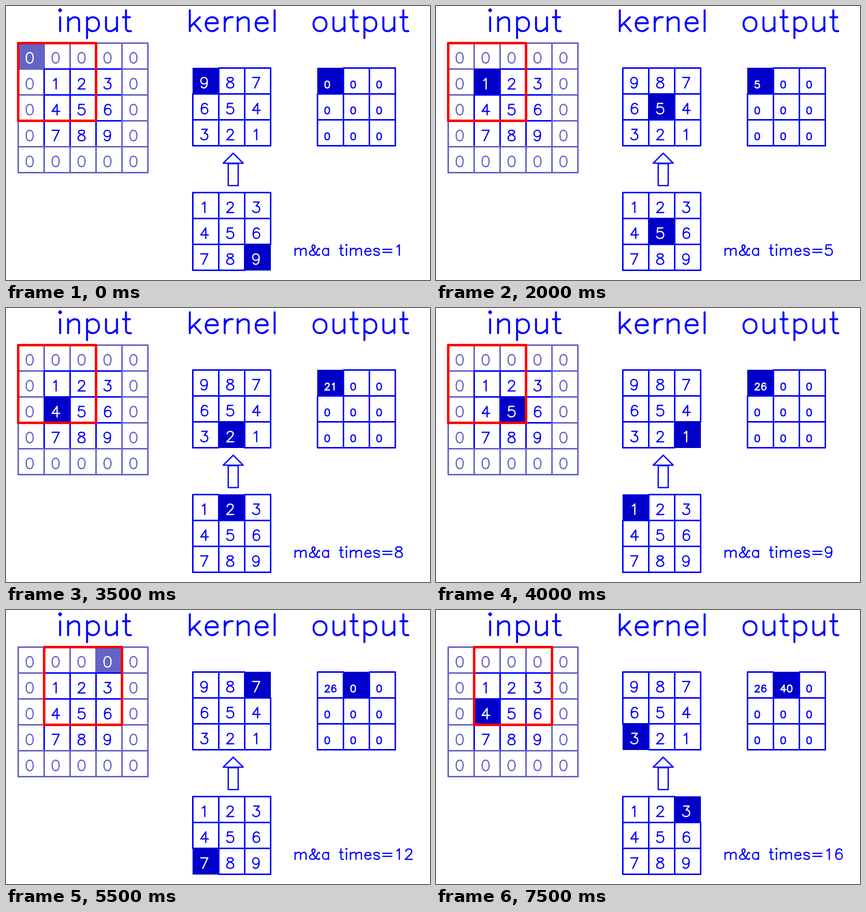
These frames come from a looping animation (850 px wide and 550 px high, 8000 ms). An HTML page with a canvas:

```html
<!DOCTYPE html>
<html lang="en">
<head>
<meta charset="utf-8">
<title>Convolution step by step</title>
<style>
html, body { margin: 0; width: 100%; height: 100%; overflow: hidden; background: #fff; }
canvas { display: block; }
</style>
</head>
<body>
<canvas id="stage" width="850" height="550" role="img" aria-label="input, kernel, output, m&amp;a times">input, kernel, output, m&amp;a times</canvas>
<script>
const ctx = document.getElementById('stage').getContext('2d');
const BLUE = '#00f', DARK = '#0000c8', PALE = '#6464c8', WHITE = '#fff', RED = '#f00';
const CELL = 52, STEP = 500, LOOP = 8000;

// Single-stroke lettering: cap top at y = 0, baseline at y = 21.
const round = '9.5 7C5.5 7 3 10 3 14S5.5 21 9.5 21';
const tail = 'C11.5 21 13 20 15 18';
const belly = '17 14C17 18 14.5 21 9.5 21C6 21 4 19.5 3 17';
const arch = 'M4 7V21M4 11C7 8 8.5 7 10.5 7C14 7 15 9 15 11V21';

const digits = [
  'M10 0C5 0 3 5 3 10.5S5 21 10 21 17 16 17 10.5 15 0 10 0Z',
  'M6 4L8 3 11 0V21',
  'M4 5C4 -1.5 16 -1.5 16 5C16 8.5 13.5 10.5 13 11L3 21H17',
  'M5 0H16L10 8C15 8 17 10.5 ' + belly,
  'M13 21V0L3 14H18',
  'M15 0H5L4 9C5 7.5 7 7 9.5 7C14.5 7 17 10 ' + belly,
  'M16 3C15 1 13.5 0 11 0C6 0 4 5 4 13C4 18 6.5 21 10.5 21S17 18 17 14.5 14.5 8 10.5 8 4 11 4 14',
  'M3 0H17L7 21',
  'M10 0C6 0 4 1.5 4 4C4 9 17 7.5 17 15.5C17 19 15 21 10 21S3 19 3 15.5C3 7.5 16 9 16 4C16 1.5 14 0 10 0Z',
  'M4 18C5 20 6.5 21 9 21C14 21 16 16 16 8C16 3 13.5 0 9.5 0S3 3 3 6.5 5.5 13 9.5 13 16 10 16 7'
];

// Advance width and strokes.
const letters = {
  ' ': [16, ''],
  '=': [26, 'M4 9H22M4 15H22'],
  '&': [26, 'M23 9C23 6.5 20.5 6 19 10C17 16 15 21 9 21C5 21 3 19 3 16C3 11.5 14 10 14 4C14 -1 8 -1 8 4C8 7 15 20 20 21Q23 21.5 23 19'],
  a: [19, 'M15 7V21M15 10C13 8 11.5 7 ' + round + tail],
  e: [18, 'M3 13H15C15 9 12.5 7 ' + round + tail],
  i: [8, 'M3 0L4 1 5 0 4 -1ZM4 7V21'],
  k: [17, 'M4 0V21M14 7L4 17M8 13L15 21'],
  l: [8, 'M4 0V21'],
  m: [30, arch + 'M15 11C18 8 19.5 7 21.5 7C25 7 26 9 26 11V21'],
  n: [19, arch],
  o: [19, 'M' + round + 'S16 18 16 14 13.5 7 9.5 7Z'],
  p: [19, 'M4 7V28M4 10C6 8 7.5 7 9.5 7C13.5 7 16 10 16 14S13.5 21 9.5 21C7.5 21 6 20 4 18'],
  r: [13, 'M4 7V21M4 13C5 9 7 7 10 7H12'],
  s: [17, 'M14 10C13 8 11.5 7 8.5 7C5 7 3 8 3 10C3 15 14 12 14 17.5C14 20 12 21 8.5 21C5.5 21 4 20 3 18'],
  t: [12, 'M5 0V17C5 20 6 21 8 21H10M2 7H9'],
  u: [19, 'M4 7V17C4 20 5.5 21 8.5 21C10.5 21 12 20 15 17M15 7V21']
};

const font = {};
digits.forEach((d, n) => { font[n] = { width: 20, path: new Path2D(d) }; });
for (const [ch, [width, d]] of Object.entries(letters)) font[ch] = { width, path: new Path2D(d) };

function write(text, x, y, scale, weight, color) {
  ctx.save();
  ctx.translate(x + 0.5, y + 0.5);
  ctx.scale(scale, scale);
  ctx.translate(0, -21);
  ctx.strokeStyle = color;
  ctx.lineWidth = weight / scale;
  for (const ch of String(text)) {
    ctx.stroke(font[ch].path);
    ctx.translate(font[ch].width, 0);
  }
  ctx.restore();
}

function frame(x, y, w, h, weight, color) {
  ctx.strokeStyle = color;
  ctx.lineWidth = weight;
  ctx.strokeRect(x + 0.5, y + 0.5, w, h);
}

function cell(x, y, value, active, scale = 1, pale = false) {
  if (active) {
    ctx.fillStyle = pale ? PALE : DARK;
    ctx.fillRect(x, y, CELL + 1, CELL + 1);
  } else {
    frame(x, y, CELL, CELL, 3, pale ? PALE : BLUE);
  }
  write(value, x + 13, y + 40, scale, 2.5, active ? WHITE : pale ? PALE : BLUE);
}

function grid(x, y, valueAt, active, scale) {
  for (let i = 0; i < 9; i++) {
    cell(x + i % 3 * CELL, y + Math.floor(i / 3) * CELL, valueAt(i), i === active, scale);
  }
}

const isPad = (r, c) => r < 1 || r > 3 || c < 1 || c > 3;
const inputAt = (r, c) => isPad(r, c) ? 0 : (r - 1) * 3 + c;

// Sum of the first `count` products of the window at output position `pos`.
function partial(pos, count) {
  let sum = 0;
  for (let i = 0; i < count; i++) {
    sum += inputAt(Math.floor(pos / 3) + Math.floor(i / 3), pos % 3 + i % 3) * (9 - i);
  }
  return sum;
}

function arrow() {
  ctx.strokeStyle = BLUE;
  ctx.lineWidth = 2.6;
  ctx.stroke(new Path2D('M455.5 295.5L435.5 315.5H475.5Z'));
  frame(445, 316, 20, 44, 2.6, BLUE);
}

function draw(step) {
  const pos = Math.floor(step / 9), tap = step % 9;
  const top = Math.floor(pos / 3), left = pos % 3;
  ctx.fillStyle = WHITE;
  ctx.fillRect(0, 0, 850, 550);
  ctx.lineJoin = ctx.lineCap = 'round';

  write('input', 100, 50, 2, 4, BLUE);
  write('kernel', 360, 50, 2, 4, BLUE);
  write('output', 610, 50, 2, 4, BLUE);

  for (let r = 0; r < 5; r++) {
    for (let c = 0; c < 5; c++) {
      const active = r === top + Math.floor(tap / 3) && c === left + tap % 3;
      cell(24 + c * CELL, 74 + r * CELL, inputAt(r, c), active, 1, isPad(r, c));
    }
  }
  frame(24 + left * CELL, 74 + top * CELL, 3 * CELL, 3 * CELL, 5, RED);

  grid(374, 124, i => 9 - i, tap);
  grid(374, 374, i => i + 1, 8 - tap);
  grid(624, 124, i => i < pos ? partial(i, 9) : i === pos ? partial(i, tap + 1) : 0, pos, 0.65);
  arrow();
  write('m&a times=' + (step + 1), 575, 500, 1, 2.5, BLUE);
}

const start = performance.now();
let shown = -1;
function tick() {
  const step = Math.floor((performance.now() - start) % LOOP / STEP);
  if (step !== shown) draw(shown = step);
  requestAnimationFrame(tick);
}
tick();
</script>
</body>
</html>
```
